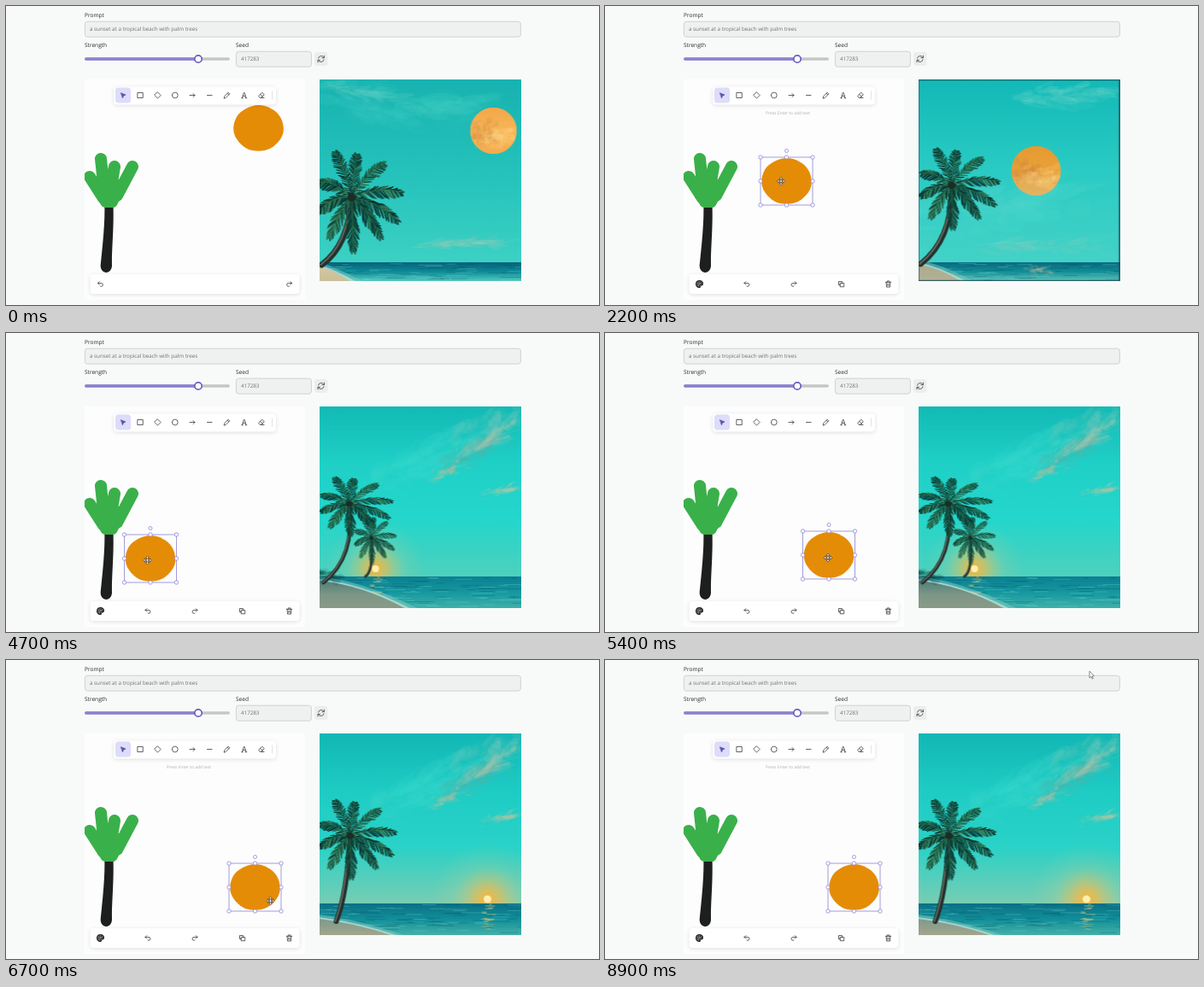
An HTML page with a canvas for the animation above (9 s loop, 694 px wide and 350 px high).

```html
<!DOCTYPE html>
<html lang="en">
<head>
<meta charset="utf-8">
<title>Sketch to image</title>
<style>
html, body { margin: 0; width: 694px; height: 350px; overflow: hidden; background: #f8faf9; }
svg { position: absolute; left: 0; top: 0; }
canvas { position: absolute; left: 366px; top: 86px; }
text { font-family: "Open Sans", "Noto Sans", sans-serif; text-rendering: geometricPrecision; }
.label { font-size: 6.55px; fill: #25292d; }
.value { font-size: 6.25px; fill: #6e7274; }
.field { fill: #eff1f0; stroke: #c6c9c8; stroke-width: .8; }
.bar { fill: #fff; filter: drop-shadow(0 1px 2px rgba(0,0,0,.12)); }
.icon { fill: none; stroke: #3c3c40; stroke-width: .8; stroke-linecap: round; stroke-linejoin: round; }
.handle { fill: #fff; stroke: #8b83d8; stroke-width: .8; }
</style>
</head>
<body>
<svg width="694" height="350" viewBox="0 0 694 350">
  <defs><clipPath id="board"><rect x="92" y="86" width="258" height="258"/></clipPath></defs>
  <text class="label" x="92" y="13.3">Prompt</text>
  <rect class="field" x="92.4" y="18.2" width="510" height="18" rx="3"/>
  <text class="value" x="98" y="29.4">a sunset at a tropical beach with palm trees</text>
  <text class="label" x="92" y="48.3">Strength</text>
  <rect x="92" y="60.2" width="170" height="3.6" rx="1.8" fill="#c5c7c7"/>
  <rect x="92" y="60.2" width="133" height="3.6" rx="1.8" fill="#8c80d2"/>
  <circle cx="225" cy="62" r="4.2" fill="#fff" stroke="#6a5cc0" stroke-width="1.7"/>
  <text class="label" x="269" y="48.3">Seed</text>
  <rect class="field" x="269.4" y="53.2" width="88" height="18" rx="3"/>
  <text class="value" x="275" y="64.4">417283</text>
  <rect x="361" y="54" width="15.5" height="16" rx="3" fill="#eceeed"/>
  <path class="icon" d="M365.5 61.2a3.5 3.5 0 0 1 6.2-1.3l.6.7M372.4 58.2v2.5h-2.5M372 62.8a3.5 3.5 0 0 1-6.2 1.3l-.6-.7M365 65.8v-2.5h2.5"/>
  <rect x="92" y="86" width="258" height="258" fill="#fdfdfd"/>
  <g clip-path="url(#board)">
    <path d="M115.300 232C116 255 113 280 110.700 303C110 314.500 123.500 315 124 304C123.500 285 126.500 260 125.500 232Z" fill="#1c1f1e"/>
    <g fill="#3ab04a" stroke="#3ab04a" stroke-width="14" stroke-linecap="round" stroke-linejoin="round">
      <path d="M111 179L115 217M98 200L114 225M127 188L122 218M148 188L130 222" fill="none"/>
      <path d="M108 210L117 229H124L133 211 114 204Z"/>
    </g>
    <path id="sun" fill="#e58c07"/>
    <g id="selection" fill="none" stroke="#8b83d8" stroke-width=".8"><rect x="-30.500" y="-28" width="61" height="56"/></g>
  </g>
  <text id="hint" x="188" y="127" font-size="4.95" fill="#acafb1">Press Enter to add text</text>
  <rect class="bar" x="126" y="94.500" width="190" height="21" rx="4"/>
  <rect x="128" y="95.500" width="18" height="18" rx="3.500" fill="#dedcfb"/>
  <g id="tools" class="icon"></g>
  <path d="M311.500 99.500v10" stroke="#e3e3e6"/>
  <rect class="bar" x="98.500" y="314" width="245" height="23" rx="4"/>
  <g id="actions" class="icon"></g>
</svg>
<canvas id="photo" width="237" height="236"></canvas>
<svg width="694" height="350" viewBox="0 0 694 350">
  <path id="arrow" d="M0-4V4L1.900 2.300 3.200 5.100 4.400 4.600 3.100 1.900 5.400 1.700Z" fill="#fff" stroke="#555b5d" stroke-width=".7"/>
  <path id="move" d="M0-5L2-2.900H.700V-.700H2.900V-2L5 0 2.900 2V.700H.700V2.900H2L0 5-2 2.900H-.700V.700H-2.900V2L-5 0-2.900-2V-.700H-.700V-2.900H-2Z" fill="#fff" stroke="#333" stroke-width=".7"/>
</svg>
<script>
const $ = id => document.getElementById(id);
const NS = "http://www.w3.org/2000/svg";
const LOOP = 9000, STEP = 100, SIZE = 236;

function add(parent, tag, attrs) {
  const el = document.createElementNS(NS, tag);
  for (const k in attrs) el.setAttribute(k, attrs[k]);
  return parent.appendChild(el);
}
const show = (el, on) => el.setAttribute("visibility", on ? "visible" : "hidden");
const place = (el, [x, y]) => el.setAttribute("transform", `translate(${x} ${y})`);

// Toolbar icons, each drawn around its own centre
const tools = [
  "M-2.3-2.600L3-.500.600.500-.400 2.900Z", "M-3-3H3V3H-3Z", "M0-3.600L3.600 0 0 3.600-3.600 0Z",
  "M-3.400 0a3.400 3.400 0 1 0 6.800 0a3.400 3.400 0 1 0-6.800 0", "M-3 0H3M1-2L3 0 1 2", "M-2.800 0H2.800",
  "M-3.300 3.300L-2.800 1.100 1.700-3.300 3.300-1.700-1.100 2.800ZM.600-2.200L2.200-.600",
  "M-3 3.200h1.600M1.400 3.200H3M-2.300 3.200L-.400-3H.400L2.300 3.200M-1.500.900H1.500",
  "M-.700 3H3M-3.200.700L.800-3.200 3.300-.800-.500 3H-1.200ZM-1.400-1L1.200 1.500"
];
tools.forEach((d, i) => {
  const icon = add($("tools"), "path", { d, transform: `translate(${137 + i * 20.25} 104.5)` });
  if (!i) icon.setAttribute("style", "fill:#5753a8;stroke:#5753a8");
});

const action = d => add($("actions"), "path", { d });
const palette = action("M.500 3.700C-2.500 4-4 2-3.900-.100C-3.700-2.400-1.800-3.900.300-3.800C2.500-3.700 4-2.200 3.900-.400C3.800 1.200 2.400 1.300 1.300 1.200C.200 1.100 0 2 .600 2.600C1 3.100 1 3.600.500 3.700ZM-2 .300h.1M-1.200-1.700h.1M.800-2.100h.1M2.200-.600h.1");
palette.setAttribute("style", "fill:#77777c;stroke:#222;stroke-width:1.300");
const undo = action("M-1.200.700L-3-1.100-1.200-2.900M-3-1.100H1a1.900 1.900 0 0 1 0 3.800H.200");
const redo = action("M1.200.700L3-1.100 1.200-2.900M3-1.100H-1a1.900 1.900 0 0 0 0 3.800H-.200");
const copy = action("M-1-1H3.200V3.200H-1ZM-1 1H-3V-3H1V-1");
const trash = action("M-3.200-2.200H3.200M-2.400-2.200L-2 3.500H2L2.400-2.200M-1.200-2.200V-3.600H1.200V-2.200M-.700-.300V1.800M.700-.300V1.800");

// Hand-drawn sun and its selection handles
let outline = "";
for (let i = 0; i < 48; i++) {
  const a = i / 48 * Math.PI * 2;
  const r = 1 + .005 * Math.sin(4 * a + 1) + .005 * Math.sin(7 * a);
  outline += `${i ? "L" : "M"}${(29.2 * r * Math.cos(a)).toFixed(1)} ${(26.8 * r * Math.sin(a)).toFixed(1)}`;
}
$("sun").setAttribute("d", outline + "Z");
for (const x of [-1, 0, 1]) for (const y of [-1, 0, 1]) {
  if (x || y) add($("selection"), "rect", { class: "handle", x: x * 30.5 - 2, y: y * 28 - 2, width: 4, height: 4, rx: 1.3 });
}
add($("selection"), "circle", { class: "handle", cx: 0, cy: -35.5, r: 2 });

// Generated pictures
function random(seed) {
  return () => (seed = (seed * 16807) % 2147483647) / 2147483647;
}
function gradient(g, y0, y1, colors) {
  const fill = g.createLinearGradient(0, y0, 0, y1);
  colors.forEach((c, i) => fill.addColorStop(i / (colors.length - 1), c));
  return fill;
}
function cloud(g, seed, x, y, w, h, tilt, color) {
  const rnd = random(seed * 7919);
  g.save();
  g.translate(x, y);
  g.rotate(tilt);
  g.fillStyle = color;
  for (let i = 0; i < 60; i++) {
    const u = rnd() + rnd() - 1, v = rnd() + rnd() - 1;
    g.globalAlpha = .06 + .14 * rnd();
    g.beginPath();
    g.ellipse(u * w, v * h, w * (.05 + .2 * rnd()), h * (.08 + .24 * rnd()), v * .4, 0, 7);
    g.fill();
  }
  g.restore();
}
function glow(g, x, y, r, rgb, alpha) {
  const fill = g.createRadialGradient(x, y, 0, x, y, r);
  [alpha, alpha * .55, alpha * .18, 0].forEach((a, i) => fill.addColorStop(i / 3, `rgba(${rgb},${a})`));
  g.fillStyle = fill;
  g.fillRect(x - r, y - r, 2 * r, 2 * r);
}
function ripples(g, seed, y0, y1, count) {
  const rnd = random(seed * 7919);
  for (let i = 0; i < count; i++) {
    const y = y0 + (y1 - y0) * rnd(), w = 5 + 22 * rnd();
    g.fillStyle = rnd() > .5 ? "rgba(125,225,215,.3)" : "rgba(4,75,92,.3)";
    g.fillRect(SIZE * rnd() - w / 2, y, w, .9);
  }
}

const tips = [[-19, -53], [6, -50], [38, -40], [58, -6], [54, 27], [34, 46], [2, 62], [-26, 46], [-38, 15], [-37, -18]];
const greens = ["#07302d", "#0d4238", "#1b5a42", "#0b3a34", "#2f7450"];

function palm(g, x, y, [wide, tall], bx, by, bend, width) {
  const trunk = (color, w, shift) => {
    g.strokeStyle = color;
    g.lineWidth = w;
    g.beginPath();
    g.moveTo(x + shift, y);
    g.quadraticCurveTo(x + bend + shift, (y + by) / 2 + 16, bx + shift, by);
    g.stroke();
  };
  g.lineCap = "round";
  trunk("#20302f", width, 0);
  trunk("#6a6a5b", width * .28, -width * .2);

  const rnd = random(77 * 7919);
  g.save();
  g.translate(x, y);
  g.scale(wide, tall);
  tips.forEach(([tx, ty], k) => {
    const cx = tx * .55, cy = ty * .55 - 11;
    for (let i = 1; i <= 30; i++) {
      const t = i / 30, s = 1 - t;
      const px = 2 * s * t * cx + t * t * tx, py = 2 * s * t * cy + t * t * ty;
      const dir = Math.atan2(s * cy + t * (ty - cy), s * cx + t * (tx - cx));
      const len = 2 + 10 * Math.sin(Math.PI * (t * .85 + .08));
      for (const side of [-1, 1]) {
        const a = dir + side * (.5 + .35 * rnd());
        g.strokeStyle = greens[(k + Math.floor(rnd() * 3)) % 5];
        g.lineWidth = 1.25;
        g.beginPath();
        g.moveTo(px, py);
        g.lineTo(px + len * Math.cos(a) * .9, py + len * Math.sin(a) * .9 + len * .3);
        g.stroke();
      }
    }
    g.strokeStyle = "#3b7a4c";
    g.lineWidth = .7;
    g.beginPath();
    g.moveTo(0, 0);
    g.quadraticCurveTo(cx, cy, tx, ty);
    g.stroke();
  });
  g.fillStyle = "#1c2c28";
  g.beginPath();
  g.arc(0, 0, 5, 0, 7);
  g.fill();
  g.restore();
}

// Beach from the left edge at y down to the bottom edge at x
function beach(g, x, y, colors) {
  const shore = (fill, grow) => {
    g.fillStyle = fill;
    g.beginPath();
    g.moveTo(0, y - grow);
    g.quadraticCurveTo(x * .5, y + 5 - grow, x + 3 * grow, SIZE);
    g.lineTo(0, SIZE);
    g.fill();
  };
  shore("rgba(130,205,195,.5)", 5);
  shore("rgba(200,230,218,.7)", 2);
  shore(gradient(g, y, SIZE, colors), 0);
}
function disc(g, x, y, r, colors, seed) {
  g.save();
  g.beginPath();
  g.arc(x, y, r, 0, 7);
  g.clip();
  g.fillStyle = gradient(g, y - r, y + r, colors);
  g.fillRect(x - r, y - r, 2 * r, 2 * r);
  cloud(g, seed, x - 12, y + 2, r * .8, r * .6, 0, "#c9823f");
  cloud(g, seed + 5, x + 6, y + 8, r, r * .5, 0, "#ffd98c");
  g.restore();
}
function sky(g, colors, horizon) {
  g.fillStyle = gradient(g, 0, horizon, colors);
  g.fillRect(0, 0, SIZE, SIZE);
}
function lowSun(g, x, y, r, spread) {
  glow(g, x, y, spread * 1.8, "235,205,125", .6);
  glow(g, x, y, spread, "255,178,45", .85);
  g.fillStyle = "#fff0b0";
  g.beginPath();
  g.arc(x, y, r, 0, 7);
  g.fill();
}
function sea(g, horizon, colors) {
  g.fillStyle = gradient(g, horizon, SIZE, colors);
  g.fillRect(0, horizon, SIZE, SIZE);
}
function reflection(g, x, y) {
  const rnd = random(31 * 7919);
  for (let i = 0; i < 26; i++) {
    const v = rnd(), w = 3 + 10 * rnd();
    g.fillStyle = `rgba(240,205,120,${.65 - .5 * v})`;
    g.fillRect(x - w / 2 + (rnd() - .5) * 9, y + v * 32, w, 1);
  }
}
function eveningClouds(g) {
  cloud(g, 53, 120, 65, 95, 26, -.4, "#3fd8cb");
  cloud(g, 41, 203, 26, 48, 24, -.5, "#7fcabd");
  cloud(g, 23, 182, 54, 54, 15, -.45, "#5fb0a8");
  cloud(g, 11, 200, 38, 48, 10, -.55, "#c4cbae");
  cloud(g, 61, 150, 76, 26, 8, -.4, "#d3c39f");
  cloud(g, 37, 216, 98, 30, 6, -.2, "#dcc8a0");
}
function frame(g) {
  g.strokeStyle = "rgba(25,75,85,.8)";
  g.lineWidth = 1.5;
  g.strokeRect(.5, .5, SIZE - 1, SIZE - 1);
}

const painters = [
  g => {
    sky(g, ["#18b2b0", "#24c2bb", "#3cd1c4"], 214);
    cloud(g, 9, 95, 30, 110, 28, .1, "#45cdc2");
    cloud(g, 14, 60, 18, 60, 10, .2, "#66d3c8");
    cloud(g, 19, 175, 192, 62, 8, -.06, "#aecdb4");
    disc(g, 204, 60, 27.3, ["#f3a64b", "#f7b657", "#f5ab4e"], 5);
    sea(g, 214, ["#07617a", "#0c8b98", "#55c9bf"]);
    ripples(g, 6, 215, 235, 65);
    beach(g, 36, 219, ["#d5c8a0", "#c9bf9a"]);
    palm(g, 38, 138, [1, 1], 3, 217, -3, 7);
  },
  g => {
    sky(g, ["#12b9b7", "#2acbc4", "#43d2c7"], 214);
    cloud(g, 8, 178, 18, 70, 16, -.05, "#80d8cc");
    cloud(g, 17, 90, 150, 120, 35, -.2, "#50d5ca");
    cloud(g, 29, 150, 195, 75, 11, 0, "#85d0bf");
    disc(g, 138, 107, 29, ["#e69a2f", "#e9a23b", "#e0b569"], 13);
    sea(g, 214, ["#08697e", "#128e98", "#62c4ba"]);
    ripples(g, 12, 215, 235, 65);
    cloud(g, 22, 143, 223, 18, 6, 0, "#dcc5a0");
    beach(g, 50, 216, ["#a8ab8f", "#b5b193"]);
    palm(g, 39, 124, [.93, .8], 3, 216, 2, 6.5);
    frame(g);
  },
  g => {
    sky(g, ["#1fc4bd", "#2fc9c0", "#6fc4ae"], 146);
    cloud(g, 10, 70, 28, 80, 24, .2, "#4ad6cb");
    cloud(g, 15, 200, 25, 60, 32, .3, "#48a9a8");
    cloud(g, 16, 155, 62, 32, 10, -.3, "#5b9c9c");
    cloud(g, 24, 190, 98, 60, 22, -.2, "#5fa39d");
    cloud(g, 33, 185, 112, 50, 10, -.2, "#b9c2a0");
    lowSun(g, 121, 142, 5.5, 42);
    sea(g, 146, ["#12868f", "#1da3a3", "#3db4ab", "#4fae a6".replace(" ", ""), "#5aa79c"]);
    ripples(g, 18, 147, 205, 150);
    cloud(g, 71, 140, 183, 100, 8, .08, "#9fd8ca");
    cloud(g, 72, 170, 203, 80, 6, .1, "#9fd0c0");
    reflection(g, 121, 146);
    beach(g, 215, 186, ["#5f9f97", "#74998c", "#789487"]);
    palm(g, 40, 118, [.78, .75], 8, 210, 5, 6);
    frame(g);
  },
  g => {
    sky(g, ["#13bab5", "#1fd0c7", "#24d6cb", "#4fd0bd"], 199);
    eveningClouds(g);
    lowSun(g, 66, 190, 4, 32);
    sea(g, 199, ["#0c7f91", "#15989f", "#3fb0aa"]);
    ripples(g, 26, 200, 234, 100);
    reflection(g, 66, 199);
    beach(g, 100, 204, ["#4f7f78", "#7d9686", "#8b9a88"]);
    cloud(g, 44, 6, 198, 36, 8, .1, "#0d3b3b");
    palm(g, 61, 154, [.48, .47], 54, 199, 3, 3);
    palm(g, 35, 114, [.85, .58], 5, 206, 8, 4.5);
  },
  g => {
    sky(g, ["#12b7b4", "#1eccc4", "#2ad2c7", "#78cdb3"], 199);
    eveningClouds(g);
    lowSun(g, 197, 194, 4.5, 36);
    sea(g, 199, ["#0a7084", "#128f9a", "#45b0a7"]);
    ripples(g, 28, 200, 234, 100);
    reflection(g, 197, 199);
    beach(g, 84, 217, ["#7d9a8c", "#a3a58d"]);
    palm(g, 36, 120, [.9, .78], 20, 220, -3, 6);
  }
];
const pictures = painters.map(paint => {
  const c = document.createElement("canvas");
  c.width = c.height = SIZE;
  paint(c.getContext("2d"));
  return c;
});

// Timeline: [ms, x, y]
const sunPath = [[400, 295.5, 143], [1000, 250, 178.5], [1400, 212.5, 205], [2700, 212.5, 205],
  [3400, 169, 264], [4700, 169, 264], [5400, 262, 260], [5700, 291.5, 266]];
const cursorPath = [[100, 560, 14], [400, 276.5, 151], [1000, 231.5, 187], [1400, 194, 213], [1700, 206, 205],
  [2700, 206, 205], [3400, 162.5, 264], [3600, 165.5, 266], [4700, 165.5, 266], [5400, 261, 263],
  [5700, 290.5, 269], [6000, 292, 270], [6400, 304, 278], [6700, 309.5, 282], [7200, 340, 358],
  [8100, 430, 346], [8900, 567, 17]];
const drags = [[500, 1400], [2700, 3400], [4700, 5700]];
const pictureTimes = [0, 1700, 3400, 3800, 6000];

function along(path, t) {
  const i = path.findIndex(p => p[0] > t);
  if (i === 0) return path[0].slice(1);
  if (i < 0) return path[path.length - 1].slice(1);
  const [a, b] = [path[i - 1], path[i]];
  const k = (t - a[0]) / (b[0] - a[0]);
  return [a[1] + (b[1] - a[1]) * k, a[2] + (b[2] - a[2]) * k];
}

const photo = $("photo").getContext("2d");
let shown = -1;

function draw(t) {
  const sun = along(sunPath, t), cursor = along(cursorPath, t);
  const selected = t >= 400;
  const dragging = drags.some(([a, b]) => t >= a && t < b);
  place($("sun"), sun);
  place($("selection"), sun);
  show($("selection"), selected);
  show($("hint"), selected && !dragging);
  for (const el of [palette, copy, trash]) show(el, selected);
  place(palette, [110.5, 325.5]);
  place(undo, [selected ? 166 : 110.5, 325.5]);
  place(redo, [selected ? 221 : 331.5, 325.5]);
  place(copy, [276.5, 325.5]);
  place(trash, [331.5, 325.5]);

  const visible = t >= 100 && (t < 7200 || t >= 8100);
  const over = Math.abs(cursor[0] - sun[0]) < 31 && Math.abs(cursor[1] - sun[1]) < 28;
  show($("move"), visible && over);
  show($("arrow"), visible && !over);
  place($("move"), cursor);
  place($("arrow"), cursor);

  const index = pictureTimes.filter(p => p <= t).length - 1;
  if (index !== shown) {
    shown = index;
    photo.clearRect(0, 0, SIZE + 1, SIZE);
    photo.drawImage(pictures[index], .5, 0);
  }
}

const start = performance.now();
function tick() {
  const t = (performance.now() - start) % LOOP;
  draw(Math.floor(t / STEP) * STEP);
  requestAnimationFrame(tick);
}
tick();
</script>
</body>
</html>
```
